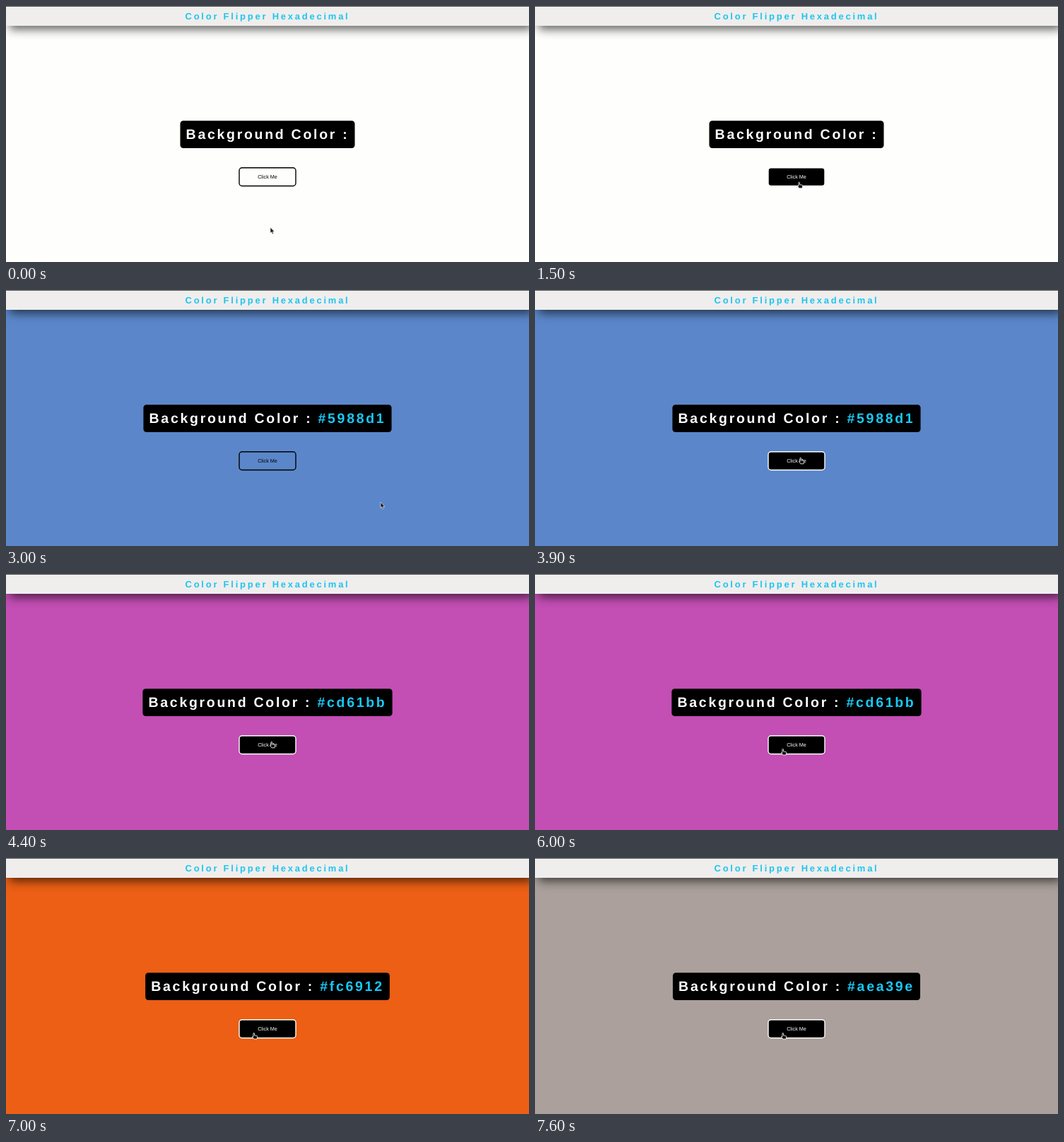
Recreate the animation shown at these times as an HTML page. Size 740 by 362 pixels, loop 8000 ms.

```html
<!DOCTYPE html>
<html lang="en">
<head>
<meta charset="utf-8">
<title>Color Flipper</title>
<style>
  html, body { margin: 0; width: 100%; height: 100%; overflow: hidden; }
  #stage { position: relative; width: 740px; height: 362px; overflow: hidden; }
  header {
    position: absolute; left: 0; top: 0; width: 740px; height: 28px;
    background: #efeeed; box-shadow: 5px 5px 14px rgba(0, 0, 0, .62);
  }
  header::before { content: ""; position: absolute; width: 100%; height: 1px; background: #555; }
  svg { position: absolute; left: 0; top: 0; }
  text {
    font-family: "Liberation Sans", Arial, sans-serif;
    text-anchor: middle; text-rendering: geometricPrecision; white-space: pre;
  }
  .title { font-size: 13px; font-weight: bold; letter-spacing: 2.76px; fill: #1fc5ee; }
  .label { font-size: 19.5px; font-weight: bold; letter-spacing: 2.71px; fill: #fff; }
  .label tspan { fill: #18c8f5; }
  .caption { font-size: 7.22px; }
</style>
</head>
<body>
<div id="stage">
  <header></header>
  <svg width="740" height="362" viewBox="0 0 740 362">
    <text class="title" x="370" y="19">Color Flipper Hexadecimal</text>
    <rect id="box" y="162.2" height="38.7" rx="4.3"/>
    <text class="label" id="label" x="370" y="188">Background Color :<tspan id="hex"></tspan></text>
    <rect id="button" x="330" y="228.7" width="80" height="25.8" rx="4" stroke-width="1.4"/>
    <text class="caption" id="caption" x="370" y="244.2">Click Me</text>
    <g id="cursor" stroke="#fff" stroke-linejoin="round">
      <path id="arrow" stroke-width=".6" fill="#1a1a1a"
        d="M0 0V8.3L1.9 6.6L3.2 9.5L4.6 8.9L3.4 6.1H5.8Z"/>
      <path id="hand" stroke-width=".8" fill="#111"
        d="M-.8 .9Q0 -.4 .8 .9V3.8L4.4 4.4Q5.2 4.7 5 5.8L4.4 9H.1L-2.1 6.1Q-2.4 5 -1.4 5.1L-.8 5.7Z"/>
    </g>
  </svg>
</div>
<script>
  const LOOP = 8000, STEP = 100, FADE = 200;
  const $ = id => document.getElementById(id);

  // time, page colour, hex value
  const pages = [
    [0, '#fefefc', ''],
    [2100, '#5b87ca', '#5988d1'],
    [4400, '#c34eb4', '#cd61bb'],
    [6500, '#ec5f14', '#fc6912'],
    [7400, '#aba09b', '#aea39e']
  ];

  // start, end, x, y of each pointer move
  const home = [374, 313];
  const moves = [
    [300, 1200, 374, 256],
    [1200, 1300, 373.7, 248.8],
    [2400, 3000, 530, 300],
    [3100, 3900, 375.7, 236.8],
    [4800, 5300, 280, 280],
    [5400, 6000, 350.7, 247]
  ];

  // pointer enters or leaves the button
  const hovers = [[1300, 2600], [3700, 5000], [5800, LOOP + FADE]];

  const clamp = v => Math.min(1, Math.max(0, v));
  const ease = p => p * p * (3 - 2 * p);
  const grey = v => `rgb(${v},${v},${v})`;
  let shown = null;

  function pointer(t) {
    let [x, y] = home;
    for (const [from, to, tx, ty] of moves) {
      const p = ease(clamp((t - from) / (to - from)));
      x += (tx - x) * p;
      y += (ty - y) * p;
    }
    return [x, y];
  }

  function showPage(page) {
    if (page === shown) return;
    shown = page;
    $('stage').style.background = page[1];
    $('hex').textContent = page[2] && ' ' + page[2];
    const width = $('label').getComputedTextLength() + 16.25;
    $('box').setAttribute('x', 370 - width / 2);
    $('box').setAttribute('width', width);
  }

  function showButton(t) {
    let glow = 0;
    for (const [on, off] of hovers)
      glow += clamp((t - on + STEP) / FADE) - clamp((t - off + STEP) / FADE);
    const light = Math.round(255 * glow);
    $('button').setAttribute('fill', '#000');
    $('button').setAttribute('fill-opacity', glow);
    $('button').setAttribute('stroke', grey(light));
    $('caption').setAttribute('fill', grey(light));
  }

  function draw(now) {
    const t = Math.floor(now % LOOP / STEP) * STEP;
    const over = hovers.some(([on, off]) => t >= on && t < off);
    showPage(pages.filter(p => p[0] <= t).pop());
    showButton(t);
    $('cursor').setAttribute('transform', `translate(${pointer(t)})`);
    $('arrow').style.display = over ? 'none' : '';
    $('hand').style.display = over ? '' : 'none';
  }

  const start = performance.now();
  function tick() {
    draw(performance.now() - start);
    requestAnimationFrame(tick);
  }
  tick();
</script>
</body>
</html>
```
